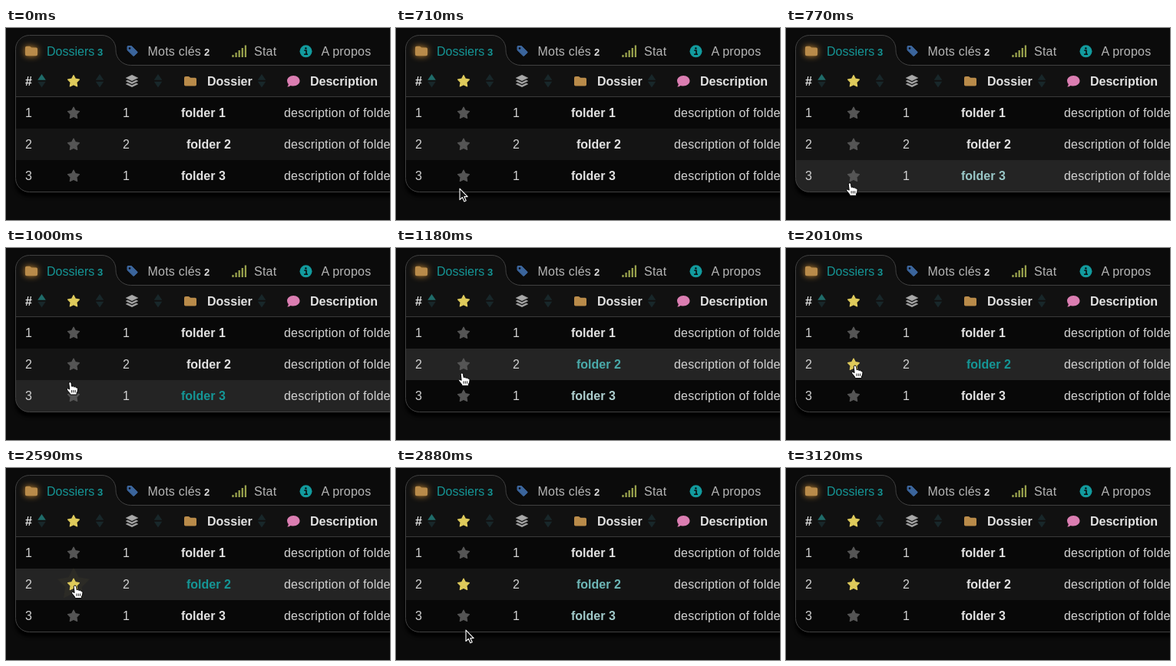
An HTML page that plays this animation: 500 px wide and 250 px high, repeating every 4190 ms.

```html
<!DOCTYPE html>
<html lang="fr">
<head>
<meta charset="utf-8">
<style>
  html, body { margin: 0; width: 100%; height: 100%; overflow: hidden; background: #0b0b0b; }
  svg { display: block; width: 500px; height: 250px; }
  text { font: 16px "Liberation Sans", Arial, sans-serif; letter-spacing: .22px; fill: #d2d2d2; }
  .tab { fill: #b6b6b6; }
  .bold { font-weight: bold; letter-spacing: 0; fill: #e2e2e2; }
  .small { font-size: 13px; }
  .teal { fill: #159696; letter-spacing: 0; }
  .star { stroke-width: 1.4; stroke-linejoin: round; }
  .glow { filter: drop-shadow(0 0 4px #c98a35); }
  #shadow { filter: drop-shadow(-1px 6px 2px #000); }
</style>
</head>
<body>
<svg viewBox="0 0 500 250">
  <defs>
    <path id="panel" d="M12.5 195.5V27.5A18 18 0 0 1 30.5 9.5H125A18 18 0 0 1 143 27.5V29A19.5 19.5 0 0 0 162.5 48.5H520V213.5H30.5A18 18 0 0 1 12.5 195.5Z"/>
    <clipPath id="inside"><use href="#panel"/></clipPath>
    <path id="folder" d="M2 0H5.5Q6.3 0 7 .7L8.3 1.8H14.2Q16 1.8 16 3.6V10.8Q16 12.6 14.2 12.6H1.8Q0 12.6 0 10.8V1.8Q0 0 2 0Z" fill="#b98b4a"/>
    <path id="starShape"/>
    <path id="up" d="M-5.3 8.3L0 .5L5.3 8.3Z"/>
    <path id="down" d="M-5.3 10.2H5.3L0 18Z"/>
  </defs>

  <use id="shadow" href="#panel" fill="#111"/>
  <g id="rows" clip-path="url(#inside)"></g>
  <path d="M13 89.5H500" stroke="#3a3a3a"/>
  <use href="#panel" fill="none" stroke="#414141"/>

  <g id="tabs">
    <use class="glow" href="#folder" x="25" y="23.7"/>
    <path d="M158.5 23.5H163.5L171 31.2Q171.5 31.7 171 32.2L166.7 36.3Q166.2 36.8 165.7 36.3L158 28.8V24Z" fill="#3b659c" stroke="#3b659c" stroke-linejoin="round"/>
    <circle cx="161" cy="26.5" r="1.3" fill="#0b0b0b"/>
    <path d="M295.5 35V38M299.6 32V38M303.7 29V38M307.8 26V38M311.9 22.5V38" stroke="#98a14c" stroke-width="2.3"/>
    <circle cx="390.5" cy="30.3" r="8" fill="#129a9d"/>
    <path d="M388.3 29.3H391V34M388 34.2H393" fill="none" stroke="#0b0b0b" stroke-width="1.6"/>
    <circle cx="390.4" cy="26.4" r="1.2" fill="#0b0b0b"/>
  </g>

  <g id="header">
    <use class="star" href="#starShape" x="88" y="69.5" fill="#deca5b" stroke="#deca5b"/>
    <g fill="#a8a8a8" stroke="#a8a8a8" stroke-width=".6" stroke-linejoin="round">
      <path d="M164 61.3L171.7 65L164 68.7L156.3 65Z"/>
      <path id="layer" d="M156.3 69L158.3 68L164 70.7L169.7 68L171.7 69L164 72.7Z"/>
      <use href="#layer" y="4"/>
    </g>
    <use href="#folder" x="232" y="63"/>
    <path d="M374.3 62C379 62 382.5 65 382.5 68.8S379 75.5 374.3 75.5Q372.3 75.5 370.6 75Q368.7 76.6 366.2 76.6Q367.7 75 367.8 73.2Q366 71.3 366 68.8C366 65 369.6 62 374.3 62Z" fill="#db7eb2"/>
  </g>
  <g id="labels"></g>

  <use id="ping" href="#starShape" fill="#deca5b"/>
  <g id="cursor" stroke-linejoin="round">
    <path id="arrow" d="M0 0V14.5L3.4 11.4L5.8 16.8L8.2 15.7L5.9 10.5H10.2Z" fill="#111" stroke="#fff" stroke-width="1.1"/>
    <g id="hand" stroke="#000">
      <path d="M-1.8 1.2Q-1.8 -.5 -.2 -.5T1.5 1.2L2.1 5.2Q4.1 4.2 4.9 5.8Q6.9 5 7.6 6.7Q10 6.3 10 8.5Q10 12 8.5 13.7V16H.2Q-.6 13.5 -2.6 11.6Q-4.6 9.6 -4.6 8.5Q-3.6 6.8 -.9 9Z" fill="#fff"/>
      <path d="M2 10V13.3M4.3 10V13.3M6.6 10V13.3" stroke-width=".9"/>
    </g>
  </g>
</svg>
<script>
const LOOP = 4190, FADE = 300, TICK = 58.7, MOVE_START = 420, CLICK = 2000;
const $ = id => document.getElementById(id);

const starPoints = Array.from({ length: 10 }, (_, i) => {
  const r = i % 2 ? 4 : 7.8, a = i * Math.PI / 5;
  return (r * Math.sin(a)).toFixed(2) + ' ' + (-r * Math.cos(a)).toFixed(2);
});
$('starShape').setAttribute('d', 'M' + starPoints.join('L') + 'Z');

const label = (x, y, text, cls = '') => `<text x="${x}" y="${y}" class="${cls}">${text}</text>`;
const sorter = (x, color) => `<use href="#up" x="${x}" y="59.5" fill="${color}"/><use href="#down" x="${x}" y="59.5" fill="#18272a"/>`;

$('labels').innerHTML =
  label(53, 36, 'Dossiers', 'teal') + label(119, 36, '3', 'teal bold small') +
  label(184.5, 36, 'Mots clés', 'tab') + label(258, 36, '2', 'bold small') +
  label(323, 36, 'Stat', 'tab') + label(410.5, 36, 'A propos', 'tab') +
  label(25, 75, '#', 'bold') + label(262, 75, 'Dossier', 'bold') + label(396, 75, 'Description', 'bold') +
  sorter(46.5, '#1f6c6a') + [122, 198, 333].map(x => sorter(x, '#18272a')).join('');

// Hover spans are [enter, leave] times in ms.
const rows = [
  { count: 1, x: 228, hover: [] },
  { count: 2, x: 235, hover: [[1050, 2820]] },
  { count: 1, x: 228, hover: [[720, 1050], [2820, 2880]] }
];
$('rows').innerHTML = rows.map((row, i) => {
  const top = 90 + 41 * i, base = top + 26, n = i + 1;
  return `<rect x="13" y="${top}" width="487" height="41"/>` + label(25, base, n) +
    `<use class="star" href="#starShape" x="88" y="${top + 21}"/>` +
    label(152, base, row.count) + label(row.x, base, 'folder ' + n, 'bold') +
    label(362, base, 'description of folder ' + n);
}).join('');
const bands = document.querySelectorAll('#rows rect');
const stars = document.querySelectorAll('#rows .star');
const names = document.querySelectorAll('#rows .bold');

// Pointer path: time, x, y.
const path = [
  [420, 83, 247], [710, 83, 209.5], [1000, 83.5, 175.5], [1180, 86, 163.5],
  [1350, 89, 155], [1470, 90, 153.5], [2650, 90, 153.5], [2710, 90, 157],
  [2830, 91, 175], [2890, 91, 214], [2950, 91, 236], [3040, 91, 262]
];
function pointerAt(t) {
  const i = Math.max(1, path.findIndex(p => p[0] >= t));
  const [a, b] = [path[i - 1], path[i]];
  const k = Math.max(0, (t - a[0]) / (b[0] - a[0]));
  return [a[1] + (b[1] - a[1]) * k, a[2] + (b[2] - a[2]) * k];
}

const clamp = v => Math.min(1, Math.max(0, v));
const ease = k => 1 - (1 - k) ** 2.3;
const mix = (a, b, k) => `rgb(${a.map((v, i) => Math.round(v + (b[i] - v) * k))})`;

// A short hover fades back over no longer than it lasted.
function tint(spans, t) {
  return spans.reduce((sum, [enter, leave]) => {
    if (t < enter) return sum;
    const reached = clamp((Math.min(t, leave) - enter) / FADE);
    if (t < leave) return sum + ease(reached);
    return sum + ease(reached) * (1 - ease(clamp((t - leave) / (FADE * reached))));
  }, 0);
}

function draw(time) {
  const t = time < MOVE_START ? time
    : MOVE_START + Math.floor((time - MOVE_START + 10) / TICK) * TICK;

  rows.forEach((row, i) => {
    const hot = row.hover.some(([enter, leave]) => t >= enter && t < leave);
    bands[i].setAttribute('fill', hot ? '#242424' : i % 2 ? '#141414' : '#080808');
    names[i].style.fill = mix([226, 226, 226], [21, 150, 150], tint(row.hover, t));
    const color = i === 1 && t >= CLICK ? '#deca5b' : '#555';
    stars[i].style.fill = stars[i].style.stroke = color;
  });

  const k = ease(clamp((t - CLICK) / 480));
  $('ping').setAttribute('transform', `translate(88 151.5) scale(${1 + 1.85 * k})`);
  $('ping').setAttribute('opacity', t >= CLICK && t < 2700 ? .4 * (1 - k) + .04 : 0);

  const shown = t >= MOVE_START && t < 3040;
  $('cursor').style.display = shown ? '' : 'none';
  if (shown) {
    const [x, y] = pointerAt(t);
    const overRow = t >= 720 && t < 2880;
    $('cursor').setAttribute('transform', `translate(${x} ${y})`);
    $('hand').style.display = overRow ? '' : 'none';
    $('arrow').style.display = overRow ? 'none' : '';
  }
}

const start = performance.now();
function frame() {
  draw((performance.now() - start) % LOOP);
  requestAnimationFrame(frame);
}
frame();
</script>
</body>
</html>
```
